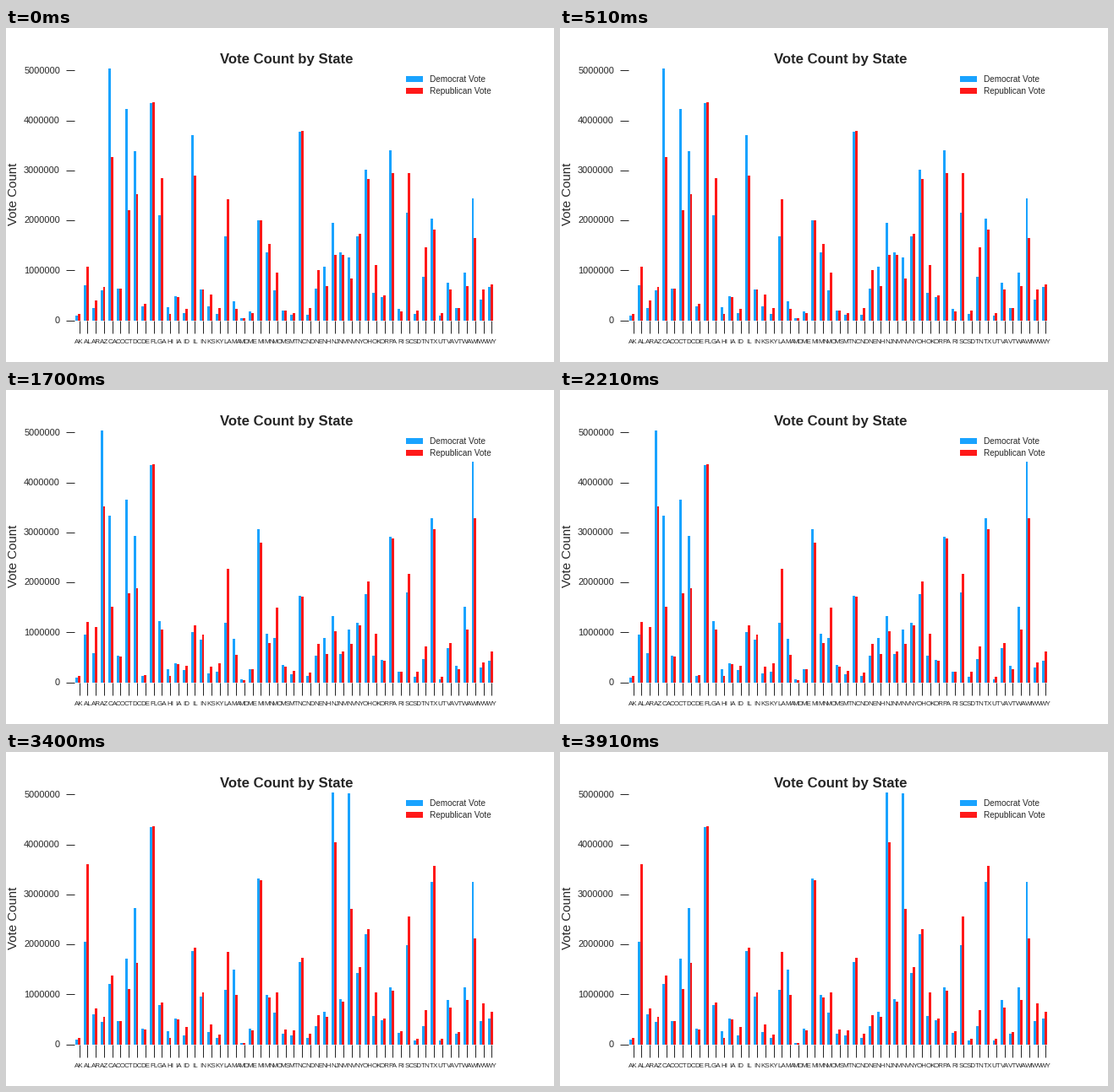
Animation of 648x396 px, one loop 4.25 s. Source, as a matplotlib script:

```python
import numpy as np
import matplotlib.pyplot as plt
from matplotlib.animation import FuncAnimation
from matplotlib.patches import Rectangle
from matplotlib.transforms import Affine2D

W, H, DPI = 648, 396, 72
INK, BLUE, RED = "#262626", "#19a3ff", "#ff1919"
BAR = 0.3
STATES = (
    "AK AL AR AZ CA CO CT DC DE FL GA HI IA ID IL IN KS KY LA MA MD ME MI MN MO MS "
    "MT NC ND NE NH NJ NM NV NY OH OK OR PA RI SC SD TN TX UT VA VT WA WI WV WY"
).split()

# Votes are in thousands. States grouped by their usual Democrat vote
SIZES = {
    30: "MD",
    90: "ND SD UT",
    150: "ID KY MT",
    280: "DE ME VT RI KS MS",
    500: "WY NE IA CO AR OK OR WV TN",
    800: "AZ MA MO NM IN VA",
    1050: "AL LA SC CA NH GA MN",
    1400: "CT DC IL NJ PA NV NY WA",
    2000: "NC OH TX WI MI",
}
# Usual Republican vote relative to the Democrat one; 1 elsewhere
LEANS = {
    1.6: "AL AR ID KS KY LA MO MT ND NE OK SD TN UT WV",
    1.3: "IN SC WY",
    0.7: "CT DC MA NH NJ NV WA WI",
}
STEADY = dict(AK=(95, 130), HI=(265, 130), FL=(4350, 4360))
# The tallest bars of each election; values over the axis limit are cut off
PEAKS = [
    dict(CA=(5200, 3270), CT=(4235, 2205), DC=(3390, 2530),
         IL=(3710, 2900), GA=(2105, 2850), PA=(3405, 2950)),
    dict(AZ=(5200, 3845), CT=(3880, 1970), IL=(3205, 3745),
         NV=(2970, 1615), TX=(3680, 4505), WI=(3105, 1905)),
    dict(AZ=(5200, 3525), CA=(3340, 1515), CT=(3660, 1785),
         DC=(2935, 1885), PA=(2920, 2885), WI=(4425, 3290)),
    dict(CA=(5200, 3710), CT=(3220, 1450), DC=(2530, 1400),
         IN=(1920, 2545), TN=(1125, 2615), WI=(3800, 2565)),
    dict(NJ=(5200, 4050), NV=(5030, 2710), DC=(2730, 1635),
         SC=(1990, 2565), TX=(3255, 3575), WI=(3255, 2125)),
]


def by_state(groups):
    return {s: value for value, names in groups.items() for s in names.split()}


def election(peaks, rng):
    """Democrat and Republican votes of every state."""
    size, lean = by_state(SIZES), by_state(LEANS)
    known = {**STEADY, **peaks}
    votes = []
    for s in STATES:
        dem = size.get(s, 0) * rng.lognormal(0, 0.3)
        rep = dem * lean.get(s, 1) * rng.lognormal(0, 0.12)
        votes.append(known.get(s, (dem, rep)))
    return np.array(votes).T


rng = np.random.default_rng(8)
elections = [election(peaks, rng) for peaks in PEAKS]

plt.rcParams.update({
    "font.family": "Liberation Sans",
    "text.color": INK,
    "axes.labelcolor": INK,
    "xtick.color": INK,
    "ytick.color": INK,
})
fig = plt.figure(figsize=(W / DPI, H / DPI), dpi=DPI, facecolor="white")
ax = fig.add_axes([0.125, 0.125, 0.775, 0.755])
ax.patch.set_visible(False)
for spine in ax.spines.values():
    spine.set_visible(False)

slots = np.arange(len(STATES))
ax.set_xlim(-0.136, 51.348)
ax.set_ylim(0, 5050)
ax.set_xticks(slots + 1.5 * BAR, STATES)
ax.set_yticks(range(0, 5001, 1000), [str(k * 1000000) for k in range(6)])
ax.tick_params(axis="x", length=15, width=1, pad=7, labelsize=8)
ax.tick_params(axis="y", length=10, width=1, pad=7, labelsize=11)
for label in ax.get_yticklabels():
    label.set_transform(label.get_transform() + Affine2D().translate(0, 0.6))
ax.set_title("Vote Count by State", fontsize=16.8, fontweight="bold", pad=6)
fig.text(13 / W, 1 - 196.5 / H, "Vote Count", fontsize=15, rotation=90,
         rotation_mode="anchor", ha="center", va="baseline")


def legend_row(y, color, label):
    """Swatch and caption with their bottom at pixel row y."""
    fig.add_artist(Rectangle((473 / W, 1 - y / H), 20 / W, 7 / H,
                             facecolor=color, linewidth=0))
    fig.text(501 / W, 1 - (y + 0.3) / H, label, fontsize=10, va="baseline")


legend_row(64, BLUE, "Democrat Vote")
legend_row(78, RED, "Republican Vote")


def make_bars(offset, color):
    return ax.bar(slots + offset, np.zeros(len(slots)), BAR, align="edge",
                  color=color, linewidth=0)


parties = [make_bars(0, BLUE), make_bars(BAR, RED)]


def draw(i):
    for bars, votes in zip(parties, elections[i]):
        for bar, v in zip(bars, votes):
            bar.set_height(v)
    return [bar for bars in parties for bar in bars]


anim = FuncAnimation(fig, draw, frames=len(elections), interval=850,
                     repeat=True, repeat_delay=0, blit=False)
plt.show()
```
